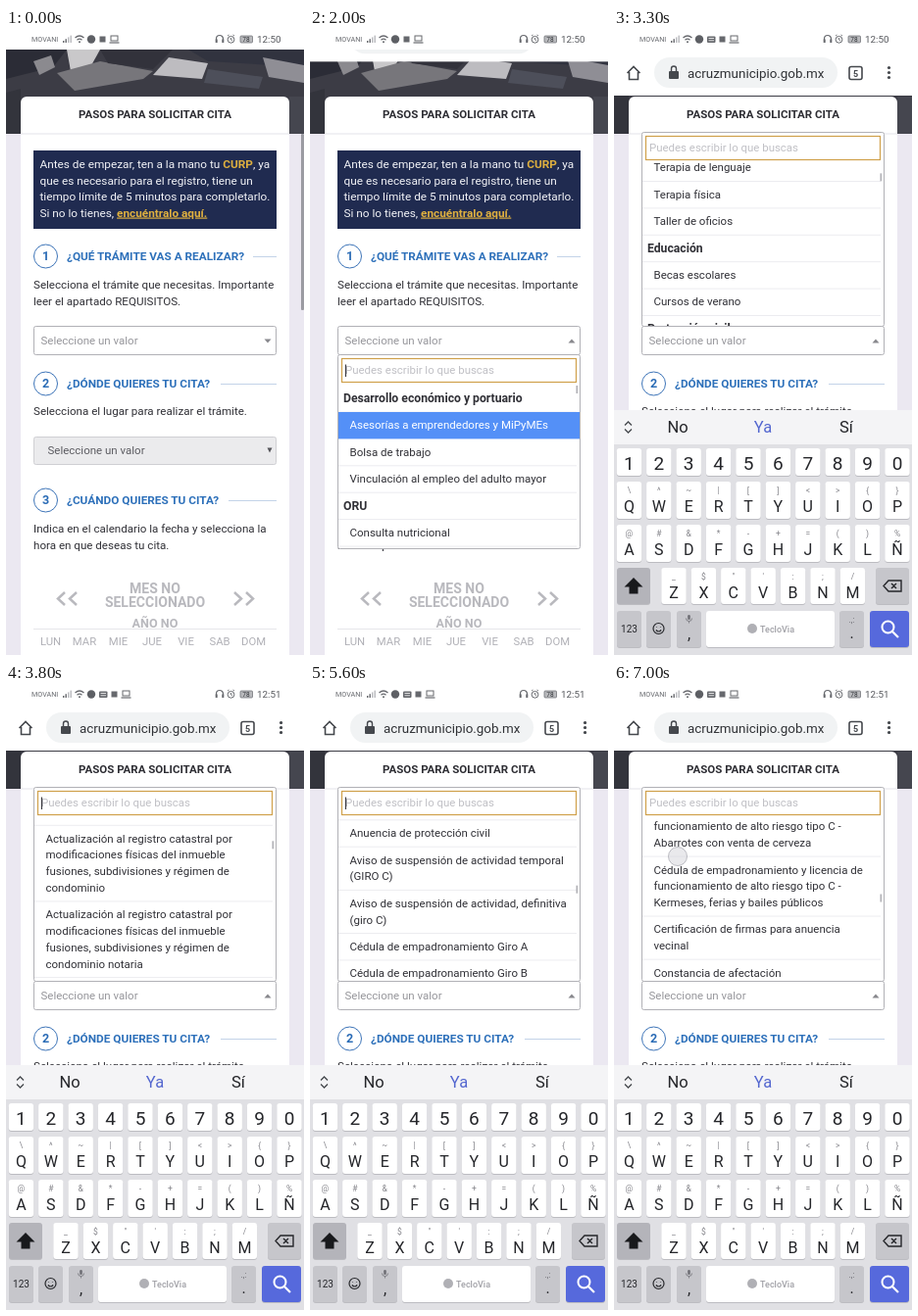
Animation of 304x640 px, one loop 7100 ms. Source, as an HTML page:

```html
<!DOCTYPE html>
<html lang="es">
<head>
<meta charset="utf-8">
<style>
  html, body { margin: 0; width: 100%; height: 100%; overflow: hidden; background: #fff; }
  svg { display: block; width: 304px; height: 640px; font-family: Roboto, sans-serif; }
</style>
</head>
<body>
<svg id="stage" viewBox="0 0 304 640"></svg>
<script>
const LOOP = 7100, ROW = 27.4, LINE = 16.75, LIST_TOP = 31.6;

// Markup helpers
const text = (x, y, s, size = 11.6, fill = '#303036', extra = '') =>
  `<text x="${x}" y="${y}" font-size="${size}" fill="${fill}" ${extra}>${s}</text>`;
const BOLD = 'font-weight="700"', MID = ' text-anchor="middle"';
const rect = (x, y, w, h, fill, rx = 0, extra = '') =>
  `<rect x="${x}" y="${y}" width="${w}" height="${h}" rx="${rx}" fill="${fill}" ${extra}/>`;
const path = (d, fill, stroke = 'none', width = 1, extra = '') =>
  `<path d="${d}" fill="${fill}" stroke="${stroke}" stroke-width="${width}" ${extra}/>`;
const circle = (x, y, r, fill, extra = '') =>
  `<circle cx="${x}" cy="${y}" r="${r}" fill="${fill}" ${extra}/>`;

// List contents: "#" marks a group title, "|" a line break
const licence = 'Cédula de empadronamiento y licencia de|funcionamiento de alto riesgo tipo C -|';
const update = 'Actualización al registro catastral por|modificaciones físicas del inmueble|fusiones, subdivisiones y régimen de|';
const records = ['Alta', 'Baja', 'Cambio', 'Corrección', 'Certificación', 'Constancia', 'Revisión'].flatMap(verb => [
  verb + ' del registro catastral por|traslado de dominio',
  verb + ' del registro catastral por|construcción del inmueble']);
const labels = [
  '#Desarrollo económico y portuario', 'Asesorías a emprendedores y MiPyMEs', 'Bolsa de trabajo',
  'Vinculación al empleo del adulto mayor', '#ORU', 'Consulta nutricional', 'Consulta psicológica',
  'Asesoría jurídica', 'Terapia de lenguaje', 'Terapia física', 'Taller de oficios', '#Educación',
  'Becas escolares', 'Cursos de verano', '#Protección civil', 'Dictamen de riesgo', '#Tesorería',
  'Pago de predial', 'Registro de contribuyentes',
  update + 'condominio', update + 'condominio notaria', ...records,
  'Cédula catastral', 'Copia de plano', 'Deslinde de predio', 'Valor catastral', 'Verificación de medidas',
  '#Ventanilla única', 'Actualización de licencia de uso de suelo', 'Alineamiento y número oficial',
  'Anuencia de protección civil', 'Aviso de suspensión de actividad temporal|(GIRO C)',
  'Aviso de suspensión de actividad, definitiva|(giro C)', 'Cédula de empadronamiento Giro A',
  'Cédula de empadronamiento Giro B', licence + 'Abarrotes con venta de cerveza',
  licence + 'Kermeses, ferias y bailes públicos', 'Certificación de firmas para anuencia|vecinal',
  'Constancia de afectación', 'Constancia de no adeudo', 'Constancia de uso de suelo'];

let height = 0;
const rows = labels.map(label => {
  const lines = label.replace('#', '').split('|'), top = height;
  height += ROW + LINE * (lines.length - 1);
  return { label, lines, top, bottom: height, title: label[0] === '#' };
});
const scrollTo = (part, offset) => rows.find(r => r.label.includes(part)).top - offset;

function listMarkup() {
  return rows.map((r, i) => {
    const active = i === 1;
    return (active ? rect(1, r.top, 246, ROW, '#5490f7') : path(`M1 ${r.bottom}H244`, 'none', '#ececf0')) +
      r.lines.map((s, k) => text(r.title ? 6 : 12.5, r.top + 17.4 + k * LINE, s, r.title ? 12.2 : 11.5,
        active ? '#fff' : '#303036', r.title ? BOLD : '')).join('');
  }).join('');
}

// Aerial view of roofs and a street in flat tones
function photo() {
  return rect(0, 22, 304, 86, '#3c3c45') +
    path('M0 22H62L48 40 0 52Z', '#2b2c36') + path('M28 34L46 28 50 40 34 48Z', '#8b8a8f') +
    path('M62 22H96L86 40 66 44Z', '#c9c8ca') + path('M52 46L96 34 150 44 140 52 70 64Z', '#77767b') +
    path('M96 22H170L150 42 104 36Z', '#32323b') + path('M150 48L166 30 206 36 200 52Z', '#bdbcc0') +
    path('M186 22H304V40L206 34Z', '#31333f') + path('M206 42L262 50 258 62 202 56Z', '#4d4f5a') +
    path('M262 30L304 38V56L268 50Z', '#8f8e95') + path('M0 66L15 62V108H0Z', '#33343c') +
    path('M289 70H304V108H289Z', '#45464f');
}

function step(n, y, title, lineX) {
  return circle(40.5, y, 12, '#fff', 'stroke="#3d74b8"') + text(40.5, y + 4.4, n, 12.5, '#2b6cb6', BOLD + MID) +
    text(62, y + 4, title, 11.8, '#2d70ba', BOLD) + path(`M${lineX} ${y + .5}H276`, 'none', '#c3d3e8');
}

function page() {
  const navy = (y, s) => text(34.5, y, s, 11.8, '#f2f3f7');
  const gold = s => `<tspan fill="#dfb03f" font-weight="700">${s}</tspan>`;
  const link = s => `<tspan fill="#dfb03f" font-weight="700" text-decoration="underline">${s}</tspan>`;
  const days = ['LUN', 'MAR', 'MIE', 'JUE', 'VIE', 'SAB', 'DOM'];
  return rect(0, 107, 304, 533, '#ebe8f1') + photo() +
    rect(15, 70, 274, 580, '#fff', 6) + rect(15, 107, 274, 2, '#f1f1f4') +
    text(152, 91.5, 'PASOS PARA SOLICITAR CITA', 11.5, '#2d2d33', BOLD + MID) +
    rect(28, 125, 248, 80, '#202b50') +
    navy(143, `Antes de empezar, ten a la mano tu ${gold('CURP')}, ya`) +
    navy(159.5, 'que es necesario para el registro, tiene un') +
    navy(176, 'tiempo límite de 5 minutos para completarlo.') +
    navy(192.5, `Si no lo tienes, ${link('encuéntralo aquí.')}`) +
    step(1, 233, '¿QUÉ TRÁMITE VAS A REALIZAR?', 252) +
    text(28, 266, 'Selecciona el trámite que necesitas. Importante') +
    text(28, 282.5, 'leer el apartado REQUISITOS.') +
    rect(28.5, 304.5, 247, 29, '#fff', 2, 'stroke="#b1b1b6"') +
    text(35.5, 323.3, 'Seleccione un valor', 11.5, '#96969b') +
    path('M263.5 317.5h7l-3.5 4Z', '#88888d', 'none', 1, 'id="arrow"') +
    step(2, 363, '¿DÓNDE QUIERES TU CITA?', 219) +
    text(28, 395, 'Selecciona el lugar para realizar el trámite.') +
    rect(28.5, 417.5, 247, 28, '#ebebed', 2, 'stroke="#cfcfd3"') +
    text(42.5, 434.5, 'Seleccione un valor', 11.5, '#5c5c62') + path('M266.5 428.5h5l-2.5 5Z', '#55555a') +
    step(3, 482, '¿CUÁNDO QUIERES TU CITA?', 227) +
    text(28, 515, 'Indica en el calendario la fecha y selecciona la') +
    text(28, 531.5, 'hora en que deseas tu cita.') +
    text(152, 577, 'MES NO', 14, '#b9b9be', BOLD + MID) +
    text(152, 591, 'SELECCIONADO', 14, '#b9b9be', BOLD + MID) +
    text(152, 612, 'AÑO NO', 12.6, '#b9b9be', BOLD + MID) +
    path('M60 576l-7 6.5 7 6.5M72 576l-7 6.5 7 6.5M233 576l7 6.5-7 6.5M245 576l7 6.5-7 6.5', 'none', '#b9b9be', 2.5) +
    path('M28 613.5H276', 'none', '#e6e6ea') +
    days.map((d, i) => text(45.5 + i * 34.5, 630, d, 11.3, '#b0b0b6', MID)).join('') +
    rect(301, 108, 3, 180, '#9b9ba2', 1, 'id="pageBar"');
}

function dropdown() {
  return `<g id="drop">` + rect(.5, .5, 247, 198, '#fff', 2, 'stroke="#b1b1b6"') +
    rect(4.5, 4.5, 239, 24, '#fff', 0, 'stroke="#cfa04a" stroke-width="1.2"') +
    text(8, 20, 'Puedes escribir lo que buscas', 11.45, '#c0c0c5') +
    path('M8.5 10.5V23', 'none', '#303036', 1, 'id="caret"') +
    `<g clip-path="url(#listClip)"><g id="list">${listMarkup()}</g></g>` +
    rect(243.5, 32, 1.6, 8, '#b0b0b5', 0, 'id="thumb"') + `</g>`;
}

function toolbar() {
  return `<g id="toolbar">` + rect(0, 22, 304, 47, '#fff') +
    path('M13.5 46L20 39.5 26.5 46M15.5 45V52.5H24.5V45', 'none', '#45484d', 1.6) +
    rect(41, 30, 187, 31, '#f1f3f4', 15.5) +
    rect(56, 44, 10, 8, '#45484d', 1) + path('M58.5 44V41.5a2.5 2.5 0 0 1 5 0V44', 'none', '#45484d', 1.4) +
    text(75, 50.5, 'acruzmunicipio.gob.mx', 13.4, '#303236') +
    rect(240, 39.5, 13, 13, 'none', 2, 'stroke="#45484d" stroke-width="1.6"') +
    text(246.5, 49.5, '5', 9, '#45484d', BOLD + MID) +
    [40.5, 45.5, 50.5].map(y => circle(280.5, y, 1.6, '#45484d')).join('') + `</g>`;
}

function keyboard() {
  const soft = '#c6c6cb', ink = '#25262a';
  const center = i => 15.4 + i * 30.4;
  const key = (x, y, w, h, fill = '#fff') => rect(x, y + 1, w, h, '#bcbcc1', 3) + rect(x, y, w, h, fill, 3);
  const keyRow = (y, h, letters, hints = '', first = 0) => [...letters].map((c, i) => {
    const x = center(i + first), hint = hints[i] === '<' ? '&lt;' : hints[i] === '&' ? '&amp;' : hints[i];
    return key(x - 12.7, y, 25.4, h) + text(x, y + (hints ? 30.5 : 21.7), c, hints ? 16 : 19, ink, MID) +
      (hints ? text(x, y + 12, hint, 8.5, '#85858b', MID) : '');
  }).join('');
  return `<g id="keyboard">` + rect(0, 390, 304, 250, '#e0e0e4') + rect(0, 390, 304, 35, '#f4f4f6') +
    path('M11 405.5l3.5-3.5 3.5 3.5M11 409.5l3.5 3.5 3.5-3.5', 'none', '#45484d', 1.3) +
    text(65, 413, 'No', 16.5, ink, MID) + text(152, 413, 'Ya', 16.5, '#5366cf', MID) +
    text(237, 413, 'Sí', 16.5, ink, MID) +
    keyRow(429, 28, '1234567890') +
    keyRow(463, 38, 'QWERTYUIOP', '\\^~|[]<>{}') +
    keyRow(507, 38, 'ASDFGHJKLÑ', '@#&*-+=()%') +
    keyRow(551, 37, 'ZXCVBNM', '_$"\':;/', 1.5) +
    key(3, 551, 34, 37, '#b4b4ba') + path('M20 561l9.5 9.5H24.5V577.5H15.5V570.5H10.5Z', '#18191c') +
    key(267, 551, 34, 37, soft) +
    path('M275 569.5l5-5.5H293V575H280ZM283 567l5 5M288 567l-5 5', 'none', ink, 1.4) +
    key(3, 595, 25, 37, soft) + text(15.5, 617, '123', 10, ink, MID) +
    key(33, 595, 25, 37, soft) + circle(45.5, 613, 5.5, 'none', `stroke="${ink}" stroke-width="1.2"`) +
    path('M42.8 614.5q2.7 3 5.4 0M43.5 611.5v.5M47.5 611.5v.5', 'none', ink, 1.2) +
    key(64, 595, 25, 37, soft) + rect(75.2, 599, 2.6, 5, '#707076', 1.3) +
    path('M73.5 602.5a3 3 0 0 0 6 0M76.5 605.5v2', 'none', '#707076', .8) +
    text(76.5, 624, ',', 16, ink, MID) +
    key(94, 595, 131, 37) + circle(141, 613, 5, '#b0b0b5') + text(149, 616.5, 'TecloVia', 9, '#a0a0a6', 'font-weight="500"') +
    key(230, 595, 25, 37, soft) + text(242.5, 607, '.,:', 8.5, '#707076', MID) + text(242.5, 623, '.', 16, ink, MID) +
    key(261, 595, 40, 37, '#5669dc') + circle(279.5, 611.5, 6, 'none', 'stroke="#fff" stroke-width="2"') +
    path('M284 616l6 6', 'none', '#fff', 2.2) + `</g>`;
}

function statusBar() {
  const ink = '#66686d';
  return rect(0, 0, 304, 22, '#fff') + text(26, 14.2, 'MOVANI', 7.2, ink) +
    [0, 1, 2, 3].map(i => rect(58 + i * 2.5, 13 - i * 1.8, 1.4, 2 + i * 1.8, i < 2 ? ink : '#b8b9bd')).join('') +
    path('M70.5 10q4.5-4 9 0M72.5 12.3q2.5-2.3 5 0', 'none', ink, 1.2) + circle(75, 14.3, 1, ink) +
    circle(87, 11.5, 4.2, '#5d5f64') +
    `<g id="keyIcon">` + rect(95, 8.5, 8.5, 6.5, ink, 1) + path('M96.5 10.5h5.5M96.5 12.8h5.5', 'none', '#fff', .8) + `</g>` +
    `<g id="icons">` + rect(95.5, 8.5, 6, 6, ink) + rect(107, 8, 7, 5, 'none', 0, `stroke="${ink}"`) +
    path('M105.5 15H115.5', 'none', ink, 1.2) + `</g>` +
    path('M214.5 13V11a3.5 3.5 0 0 1 7 0V13', 'none', ink, 1.2) + rect(213.7, 11.5, 2, 3.5, ink) + rect(220.3, 11.5, 2, 3.5, ink) +
    circle(229.5, 11.8, 3.4, 'none', `stroke="${ink}"`) + path('M229.5 10v2l1.5 1M226 8l1.5-1M233 8l-1.5-1', 'none', ink, .9) +
    rect(239, 8, 12.5, 7, '#b9babd', 1, `stroke="${ink}" stroke-width=".7"`) + text(245, 14, '78', 6.5, '#33353a', MID) +
    text(256, 15, '', 9.8, '#55575c', 'id="clock"');
}

document.getElementById('stage').innerHTML =
  `<clipPath id="listClip">${rect(1, 31, 246, 167, '#000')}</clipPath>` +
  page() + dropdown() + toolbar() + statusBar() + keyboard() +
  circle(65, 177, 9.5, '#d7d7dc', 'id="touch" fill-opacity=".55" stroke="#aeaeb5" stroke-width=".8"');

const el = id => document.getElementById(id);
const set = (id, name, value) => el(id).setAttribute(name, value);
const show = (id, on) => set(id, 'visibility', on ? 'visible' : 'hidden');
const move = (id, x, y) => set(id, 'transform', `translate(${x} ${y})`);
const progress = (t, from, to) => Math.min(1, Math.max(0, (t - from) / (to - from)));
const easeOut = p => 1 - (1 - p) ** 2;

// Drags and flings as [start, end, position reached, easing]
const linear = p => p;
const last = scrollTo('Kermeses', 39.5), paused = scrollTo('Anuencia', 2.5);
const swipes = [
  [2900, 3800, scrollTo('condominio', 9.5), linear],
  [3800, 4800, scrollTo('Ventanilla', 8.5), easeOut],
  [5000, 5350, paused, easeOut],
  [5600, 6350, (paused + last) / 2, easeOut],
  [6400, 7000, last, linear]];
const scrollAt = t => swipes.reduce((y, [from, to, goal, ease]) => y + (goal - y) * ease(progress(t, from, to)), 0);

const caretTimes = [[600, 1100], [1600, 2100], [3500, 4000], [4500, 6100], [6600, 7000]];

function draw(t) {
  const open = t >= 200, typing = t >= 2400, scroll = scrollAt(t);
  show('drop', open);
  move('drop', 28, t < 2500 ? 333 : 106);
  set('arrow', 'transform', open ? 'rotate(180 267 319.5)' : '');
  set('caret', 'opacity', +caretTimes.some(([on, off]) => t >= on && t < off));
  move('list', 0, LIST_TOP - scroll);
  move('thumb', 0, scroll / 22);
  set('pageBar', 'opacity', 1 - progress(t, 100, 400));
  move('toolbar', 0, -47 * (1 - progress(t, 1900, 2285)));
  move('keyboard', 0, 250 * (1 - easeOut(progress(t, 2150, 2450))));
  show('keyIcon', typing);
  move('icons', typing ? 12 : 0, 0);
  el('clock').textContent = t < 3500 ? '12:50' : '12:51';
  show('touch', t >= 6400);
  move('touch', 0, last - scroll);
}

function tick() {
  draw(performance.now() % LOOP);
  requestAnimationFrame(tick);
}
tick();
</script>
</body>
</html>
```
